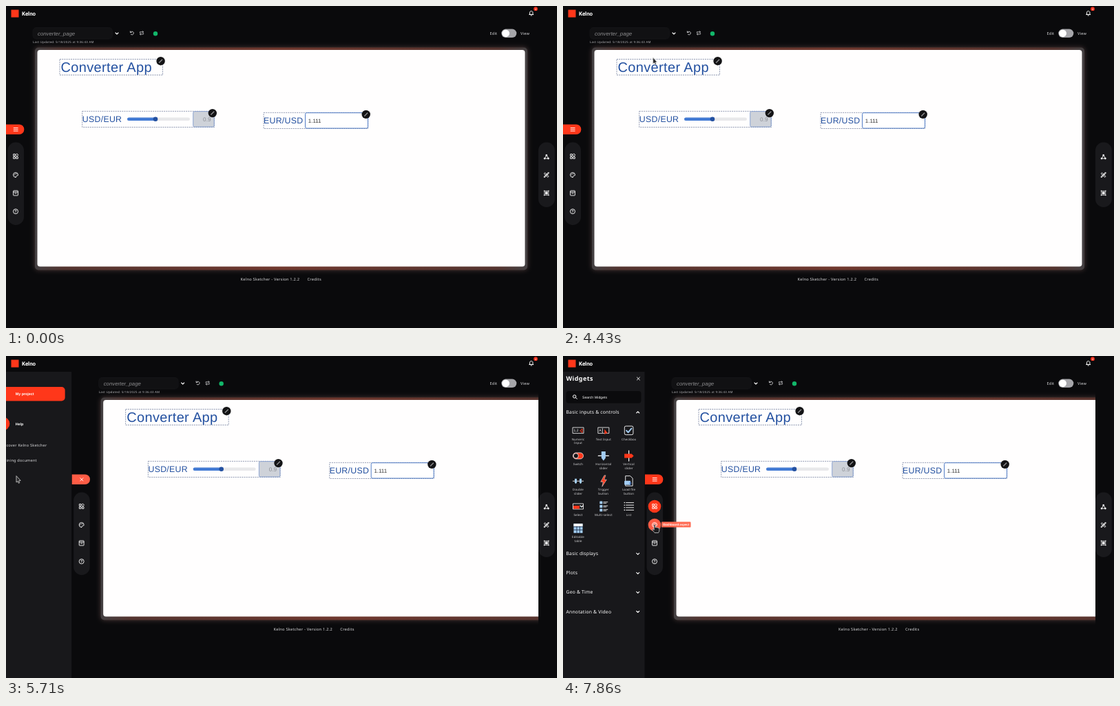
An HTML page with a canvas for the animation above (8 s loop, 800 by 469 pixels).

```html
<!DOCTYPE html>
<html lang="en">
<head>
<meta charset="utf-8">
<title>Page editor</title>
<style>
html, body { margin: 0; width: 100%; height: 100%; overflow: hidden; background: #0a0a0c; }
canvas { display: block; width: 800px; height: 469px; }
</style>
</head>
<body>
<canvas id="stage" width="800" height="469"></canvas>
<script>
const c = document.getElementById('stage').getContext('2d');
const LOOP = 8000, STEP = 1000 / 7;
const RED = '#ff371a', HOVER = '#ff5c45', BLUE = '#2350a0', WHITE = '#fff', SKY = '#a3cdf3', PANEL = '#18181b', BG = '#0a0a0c';
const NOTO = '"Noto Sans", "Open Sans", sans-serif', ARIAL = '"Liberation Sans", Arial, sans-serif';

// ---- drawing helpers ----
function text(s, x, y, size, o = {}) {
  c.font = `${o.style || ''} ${o.weight || 400} ${size}px ${o.font || NOTO}`;
  c.letterSpacing = (o.gap ?? 0.2) + 'px';
  c.textAlign = o.align || 'left';
  c.fillStyle = o.color || '#d6d6d8';
  c.fillText(s, x, y);
}
const arial = (s, x, y, size, o = {}) => text(s, x, y, size, { font: ARIAL, gap: 0, color: WHITE, ...o });

function box(x, y, w, h, r, fill, stroke, lw = 1) {
  c.beginPath();
  c.roundRect(x, y, w, h, r);
  paint(fill, stroke, lw);
}
function dot(x, y, r, fill, stroke, lw = 1) {
  c.beginPath();
  c.arc(x, y, r, 0, 7);
  paint(fill, stroke, lw);
}
function path(d, x, y, fill, stroke, lw = 1) {
  c.save();
  c.translate(x, y);
  const p = new Path2D(d);
  c.lineWidth = lw;
  c.lineJoin = c.lineCap = 'round';
  if (fill) { c.fillStyle = fill; c.fill(p); }
  if (stroke) { c.strokeStyle = stroke; c.stroke(p); }
  c.restore();
}
function paint(fill, stroke, lw) {
  if (fill) { c.fillStyle = fill; c.fill(); }
  if (stroke) { c.lineWidth = lw; c.strokeStyle = stroke; c.stroke(); }
}
function dashed(x, y, w, h) {
  c.setLineDash([2, 1.2]);
  c.strokeStyle = '#7480a0';
  c.lineWidth = 0.8;
  c.strokeRect(x, y, w, h);
  c.setLineDash([]);
}
const line = (d, x, y, lw = 1, color = WHITE) => path(d, x, y, null, color, lw);
const chevron = (x, y, up) => line(up ? 'M-2 1L0-1L2 1' : 'M-2-1L0 1L2-1', x, y, 1.1);
const cross = (x, y, r) => line(`M${-r} ${-r}L${r} ${r}M${r} ${-r}L${-r} ${r}`, x, y, 0.9);
const pencil = (x, y, color) => line('M-2 2L2-2', x, y, 1.4, color);

// ---- motion ----
function follow(keys, t) {
  let i = 0;
  while (i < keys.length - 2 && t >= keys[i + 1][0]) i++;
  const [a, ax, ay] = keys[i], [b, bx, by] = keys[i + 1];
  const p = Math.min(1, Math.max(0, (t - a) / (b - a)));
  const e = p * p * (3 - 2 * p);
  return [ax + (bx - ax) * e, ay + (by - ay) * e];
}
const ROUTE = [
  [2000, 172, 2], [2290, 147, 38], [2571, 157, 53], [4143, 157, 53], [5143, 24, 165], [5286, 15, 175],
  [5857, 15, 175], [6143, 42, 179], [6430, 42, 179], [6857, 133, 218], [7286, 133, 218], [7571, 133, 246]
];
const OPEN = 5620, SWAP = 7000;
const slide = t => 119 * (1 - (1 - Math.min(1, Math.max(0, (t - OPEN) / 225))) ** 3);

// ---- icons ----
function menuIcon(x, y) {
  line('M-3-2.3H3M-3 0H3M-3 2.3H3', x, y, 0.9);
}
function gridIcon(x, y) {
  for (const [i, j] of [[-3.3, -3.3], [-3.3, 0.7], [0.7, 0.7]]) box(x + i, y + j, 2.6, 2.6, 0, null, WHITE, 0.9);
  line('M2-3.8L3.8-2L2-.2L.2-2Z', x, y, 0.9);
}
function paletteIcon(x, y) {
  line('M0 3.5A3.5 3.5 0 1 1 3.5 0C3.5 2 1 .8 .7 1.8C.4 2.8 1 3.5 0 3.5Z', x, y, 0.9);
  for (const [i, j] of [[-1.8, -0.2], [-0.7, -1.7], [1.1, -1.6]]) dot(x + i, y + j, 0.6, WHITE);
}
function archiveIcon(x, y) {
  box(x - 3.4, y - 3.4, 6.8, 7, 0.6, null, WHITE, 0.9);
  line('M-3.4-1.4H3.4M-1.1 .5H1.1', x, y, 0.9);
}
function helpIcon(x, y) {
  dot(x, y, 3.5, null, WHITE, 0.9);
  arial('?', x, y + 1.9, 5.5, { weight: 700, align: 'center' });
}
function netIcon(x, y) {
  line('M0-2.2L-2.6 2.3H2.6Z', x, y, 0.9);
  for (const [i, j] of [[0, -2.4], [-2.7, 2.3], [2.7, 2.3]]) dot(x + i, y + j, 1.3, WHITE);
}
function toolsIcon(x, y) {
  line('M-3 3L3-3', x, y, 2);
  line('M-3 3L3-3', x, y, 0.6, PANEL);
  line('M-3.2-2.2L-2.2-3.2L3.2 2.2L2.2 3.2Z', x, y, 0.9);
}
function frameIcon(x, y) {
  box(x - 3, y - 3, 6, 6, 0, null, WHITE, 0.7);
  box(x - 1.9, y - 1.9, 3.8, 3.8, 0, WHITE);
  for (const i of [-3.2, 3.2]) for (const j of [-3.2, 3.2]) dot(x + i, y + j, 0.8, WHITE);
}

// ---- screen parts ----
function header() {
  box(0, 0, 800, 23, 0, BG);
  box(7.5, 5.5, 11, 11, 0, RED);
  text('Kelno', 23, 14.2, 8, { font: 'Roboto, sans-serif', weight: 700, gap: -0.1, color: WHITE });
  line('M-3 2.3H3M-2.2 2.2V-.7C-2.2-3.5 2.2-3.5 2.2-.7V2.2M-.5 3.7H.5', 762.7, 10.2, 1);
  dot(769, 4.2, 2.9, '#f0301c');
  arial('4', 769, 5.8, 4, { align: 'center' });
}

function toolbar() {
  box(39, 31.5, 115.5, 16.5, 5, '#111113', '#18181a', 0.7);
  arial('converter_page', 46, 42.7, 7.8, { style: 'italic', color: '#8b8b8d' });
  chevron(161, 40);
  line('M-2.2-1A2.4 2.4 0 1 1-1.5 2M-2.6-2.6V-.8H-.8', 183, 39.4, 0.9, '#d0d0d2');
  line('M-2.6-.4V-1.6H2.4M1.2-2.8L2.5-1.6L1.2-.4M2.6 .4V1.6H-2.4M-1.2 .4L-2.5 1.6L-1.2 2.8', 197, 39.4, 0.8, '#d0d0d2');
  dot(217, 40.3, 3.2, '#12b76a');
  text('Last Updated: 5/18/2025 at 9:36:43 AM', 39, 54, 4.4, { gap: 0.24, color: '#b9b9bc' });
}

function badge(x, y) {
  dot(x, y, 6.2, '#141416');
  pencil(x, y, '#8f8f92');
}

function page() {
  const edge = c.createLinearGradient(42, 0, 757, 0);
  [['#434042', 0], ['#54342f', 0.06], ['#70382e', 0.5], ['#54342f', 0.94], ['#434042', 1]].forEach(([k, p]) => edge.addColorStop(p, k));
  c.save();
  c.shadowColor = 'rgba(150,110,105,.45)';
  c.shadowBlur = 7;
  box(42, 60.5, 715, 324, 5, edge);
  c.restore();
  box(45.5, 64, 708, 315.5, 4, '#fffefe');

  dashed(78, 77.5, 149.5, 23);
  arial('Converter App', 79.5, 96.2, 20, { gap: 0.35, color: BLUE });

  dashed(110.7, 153.3, 191.8, 23.2);
  arial('USD/EUR', 110.8, 169.2, 12.3, { gap: 0.3, color: BLUE });
  box(176, 162.5, 91, 4.6, 2.3, '#e8e8ea');
  box(176, 162.5, 41, 4.6, 2.3, '#427ad4');
  dot(217, 164.8, 3.3, BLUE);
  box(271.7, 153.6, 30.5, 22.5, 2, '#ced2d9', '#7795cc', 0.8);
  arial('0.9', 297.5, 167.7, 8.2, { align: 'right', color: '#8b8e94' });

  dashed(374.1, 155.3, 151.5, 23.2);
  arial('EUR/USD', 374, 171.2, 12.3, { gap: 0.3, color: BLUE });
  box(434.5, 155.6, 91, 22.5, 2, WHITE, '#3f6fc0', 0.9);
  arial('1.111', 438.8, 169.6, 7.9, { color: '#333' });

  badge(224.6, 80.2);
  badge(299.8, 156.1);
  badge(522.7, 157.9);
}

function leftDock(s) {
  box(0, 172.5, 26.3, 14.6, [0, 7, 7, 0], s.overMenu ? HOVER : RED);
  if (s.x > 0 && !s.widgets) cross(14.2, 179.8, 2.1);
  else menuIcon(14.2, 179.8);
  box(2.5, 198.5, 23.5, 120.5, 11.7, '#19191c');
  if (s.widgets || s.overGrid) dot(14, 219, 9.3, s.overGrid ? HOVER : RED);
  if (s.overPalette) dot(14, 246, 9.3, HOVER);
  gridIcon(14, 219);
  paletteIcon(14, 246);
  archiveIcon(14, 272.4);
  helpIcon(14, 299.2);
  if (s.overPalette) {
    box(24, 241.6, 42.5, 8, 1.2, '#ff6a52');
    arial('Dashboard aspect', 45.2, 247.2, 4.4, { weight: 700, align: 'center' });
  }
}

function rightDock() {
  box(773, 198.5, 23.8, 94.5, 11.8, '#19191c');
  netIcon(784.7, 219.8);
  toolsIcon(784.7, 246);
  frameIcon(784.7, 272.4);
}

function projectPanel() {
  box(9, 45, 100, 20.5, 5, RED);
  pencil(19, 55.2, WHITE);
  arial('My project', 37, 57, 5.4, { weight: 700 });
  dot(19, 98.7, 9.7, RED);
  arial('?', 19, 103, 12.5, { weight: 700, align: 'center' });
  arial('Help', 37, 100.6, 5.4, { weight: 700 });
  text('Discover Kelno Sketcher', 15, 132, 5.6);
  text('Training document', 15, 154, 5.6);
}

const ICONS = {
  number(x, y) { box(x - 8, y - 4.5, 16, 8.5, 0, null, WHITE, 0.8); arial('1,2', x - 6.5, y + 1.7, 5); line('M-1.5 0L1.5-2.5V2.5Z', x + 4.5, y, 1, RED); },
  input(x, y) { box(x - 8, y - 4.5, 16, 8.5, 0, null, WHITE, 0.8); arial('A', x - 6.5, y + 1.7, 5); line('M0-3V3', x - 1.5, y, 0.8); path('M0-2V6L2 4L4.5 4Z', x + 1.5, y, RED); },
  check(x, y) { box(x - 6.3, y - 6.5, 12.6, 12.6, 2, null, WHITE, 0.9); line('M-3.5 0L-1 2.7L3.8-3', x, y, 2, SKY); },
  toggle(x, y) { box(x - 7.5, y - 4.5, 15, 9, 4.5, RED, WHITE, 0.7); dot(x - 3.2, y, 3.6, '#141416', WHITE, 0.8); },
  across(x, y) { line('M-7.5 0H7.5', x, y, 1.2); path('M-3-6.5H3V3L0 7L-3 3Z', x, y, SKY); },
  upright(x, y) { line('M0-7.5V7.5', x, y, 1.2); path('M-6.5-3H4L7 0L4 3H-6.5Z', x, y, RED); },
  double(x, y) { line('M-7.5 0H7.5', x, y, 0.9); for (const i of [-3.5, 3.5]) path('M-1.5-3.5H1.5V2L0 4L-1.5 2Z', x + i, y, SKY); },
  bolt(x, y) { path('M1-8L-4 1H-.5L-2 8L4.5-2H.8L3-8Z', x, y, RED, WHITE, 0.5); },
  file(x, y) { path('M-4.5-7.5H2L5.5-4V7H-4.5Z', x, y, null, WHITE, 0.9); box(x - 6.5, y - 0.5, 9, 6, 1, SKY); line('M0 2V-2M-1.5-.8L0-2.2L1.5-.8', x + 2.2, y + 4, 0.8, '#3f76d0'); },
  select(x, y) { box(x - 7.5, y - 4, 15, 8, 0, null, WHITE, 0.8); box(x - 7, y - 1, 9, 4.5, 0, RED); chevron(x + 5, y); },
  multi(x, y) { for (const j of [-5.5, 0, 5.5]) { box(x - 5.5, y + j - 2, 4, 4, 0.5, SKY); line('M0-.8H6M0 .9H4', x, y + j, 0.8); } },
  list(x, y) { for (const j of [-5.4, -1.8, 1.8, 5.4]) { dot(x - 6.3, y + j, 0.8, WHITE); line('M-4 0H7', x, y + j, 0.9); } },
  table(x, y) { box(x - 6.5, y - 7, 13, 13.5, 0, SKY); box(x - 6.5, y - 7, 13, 4, 0, WHITE); line('M-6.5-2.5H6.5M-6.5 2H6.5M-2-3V6.5M2.3-3V6.5', x, y, 0.9, '#20314a'); }
};
const WIDGETS = [
  ['number', 'Numeric', 'Input'], ['input', 'Text Input'], ['check', 'Checkbox'],
  ['toggle', 'Switch'], ['across', 'Horizontal', 'slider'], ['upright', 'Vertical', 'slider'],
  ['double', 'Double', 'slider'], ['bolt', 'Trigger', 'button'], ['file', 'Load file', 'button'],
  ['select', 'Select'], ['multi', 'Multi-select'], ['list', 'List'], ['table', 'Editable', 'table']
];
const GROUPS = ['Basic displays', 'Plots', 'Geo & Time', 'Annotation & Video'];

function widgetPanel() {
  const bold = { weight: 600, gap: 0.4, color: WHITE }, head = { weight: 500, color: WHITE };
  text('Widgets', 4.5, 36.4, 9, bold);
  cross(109.4, 33, 2);
  box(4.5, 51, 109, 17.8, 4, '#0b0b0d');
  dot(16.7, 59, 2.2, null, WHITE, 1);
  line('M0 0L2 2', 18.4, 60.6, 1);
  arial('Search Widgets', 28, 61.6, 5.1);
  text('Basic inputs & controls', 4.5, 84, 6.8, head);
  chevron(108.7, 82, true);
  WIDGETS.forEach(([icon, ...label], i) => {
    const x = 22 + i % 3 * 36.8, y = 108.6 + Math.floor(i / 3) * 36.8 - (i > 11 ? 4.5 : 0);
    ICONS[icon](x, y);
    label.forEach((s, k) => text(s, x, y + 14 + k * 5.7, 4.4, { gap: 0.15, align: 'center' }));
  });
  GROUPS.forEach((s, i) => {
    text(s, 4.5, 290.2 + i * 28.1, 6.8, head);
    chevron(108.7, 288.2 + i * 28.1);
  });
}

function cursor(x, y, hand) {
  if (hand) path('M-1 0C-1-1 1-1 1 0V4C2 3 3 3.4 3.3 4C4.2 3.5 5 4 5.2 4.6C6.2 4.4 6.8 5 6.8 6V8C6.8 9.5 6 10.5 5.5 11.5H0C-1 10-3 8-3.5 7C-4 6-2.5 5.5-1 7Z', x, y, '#1c1c1e', '#e4e4e4', 0.7);
  else path('M0 0V9L1.9 7.4L3.3 10.3L4.8 9.6L3.5 6.9L5.8 6.5Z', x, y, '#29292b', '#d8d8d8', 0.8);
}

function draw(t) {
  const x = slide(t);
  const pointing = (t > 5280 && t < 5640) || (t > 6850 && t < 7300) || t > 7500;
  const s = {
    x,
    widgets: t >= SWAP,
    overMenu: t > 5280 && t < 5800,
    overGrid: t > 6850 && t < 7300,
    overPalette: t > 7500
  };
  c.textRendering = 'geometricPrecision';
  box(0, 0, 800, 469, 0, BG);

  c.save();
  c.beginPath();
  c.rect(0, 0, x > 0 ? 773 : 800, 469);
  c.clip();
  c.translate(x, 0);
  toolbar();
  page();
  leftDock(s);
  c.restore();

  text('Edit', 702.5, 42, 5.6);
  box(719.3, 33.6, 22, 12.4, 6.2, '#a6a6aa');
  dot(725.6, 39.8, 5.4, WHITE);
  text('View', 747, 42, 5.6);
  text('Kelno Sketcher - Version 1.2.2', 340.6 + x / 2, 399.8, 5.7, { gap: 0.22 });
  text('Credits', 437.5 + x / 2, 399.8, 5.7, { gap: 0.22 });
  rightDock();

  if (x > 0) {
    c.save();
    c.translate(x - 119, 0);
    box(0, 23, 118.5, 446, 0, PANEL);
    if (s.widgets) widgetPanel();
    else projectPanel();
    c.restore();
  }
  header();
  if (t > 1990) cursor(...follow(ROUTE, t), pointing);
}

function tick(now) {
  const n = Math.min(55, Math.floor((now % LOOP + 6) / STEP));
  draw(n * STEP);
  requestAnimationFrame(tick);
}
const start = performance.now();
requestAnimationFrame(function loop() { tick.call(null, 0); });
</script>
</body>
</html>
```
